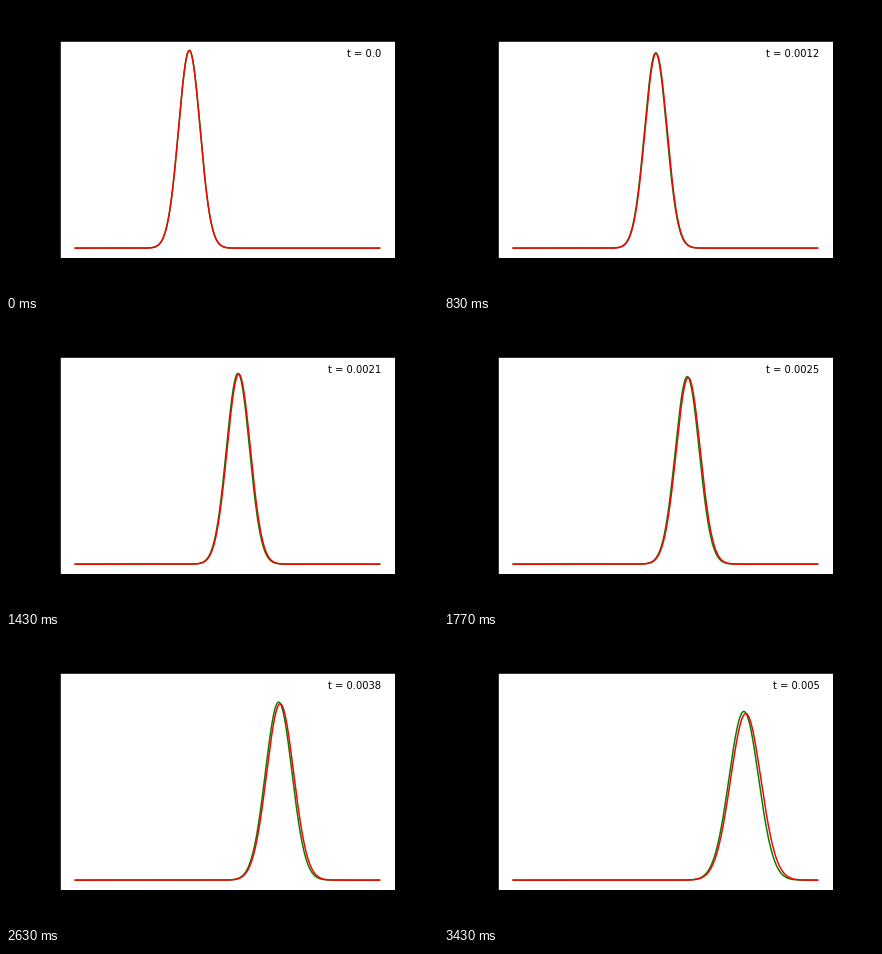
A matplotlib script that plays this animation: 432x288 px, repeating every 3.46 s.

```python
import numpy as np
import matplotlib.pyplot as plt
from matplotlib.animation import FuncAnimation

# Free wave packet: finite-difference lattice (green) against exact solution (red).
N = 1000
X0, SIGMA, K0 = -0.25, 0.05, 50 * np.pi
TICK, LOOP = 10, 3460        # ms
STEPS_PER_POSE = 12

x = np.linspace(-1, 1, N)
dx = x[1] - x[0]
dt = dx ** 2
k = 2 * np.pi * np.fft.fftfreq(N, dx)

psi0 = np.exp(-(x - X0) ** 2 / (4 * SIGMA ** 2) + 1j * K0 * x)
spectrum = np.fft.fft(psi0)
lattice_energy = (1 - np.cos(k * dx)) / dx ** 2
exact_energy = k ** 2 / 2


def modulus(energy, t):
    return np.abs(np.fft.ifft(spectrum * np.exp(-1j * energy * t)))


fig = plt.figure(figsize=(6, 4), dpi=72, facecolor="black")
ax = fig.add_axes([0.125, 0.125, 0.775, 0.755], facecolor="white")
ax.set(xticks=[], yticks=[], xlim=(-1.1, 1.1), ylim=(-0.05, 1.05))

lattice_line, = ax.plot(x, np.abs(psi0), color="green", lw=1.5)
exact_line, = ax.plot(x, np.abs(psi0), color="red", lw=1.5)
label = ax.text(0.96, 0.96, "", transform=ax.transAxes, ha="right", va="top",
                fontsize=10, family="DejaVu Sans")


def update(tick):
    # The picture changes 30 times a second, rounded to 10 ms ticks.
    pose = (2 * tick + 1) * 3 // 20
    t = pose * STEPS_PER_POSE * dt
    lattice_line.set_ydata(modulus(lattice_energy, t))
    exact_line.set_ydata(modulus(exact_energy, t))
    label.set_text(f"t = {round(float(t), 4)}")
    return lattice_line, exact_line, label


anim = FuncAnimation(fig, update, frames=LOOP // TICK, interval=TICK,
                     repeat=True, repeat_delay=0, cache_frame_data=False)
plt.show()
```
